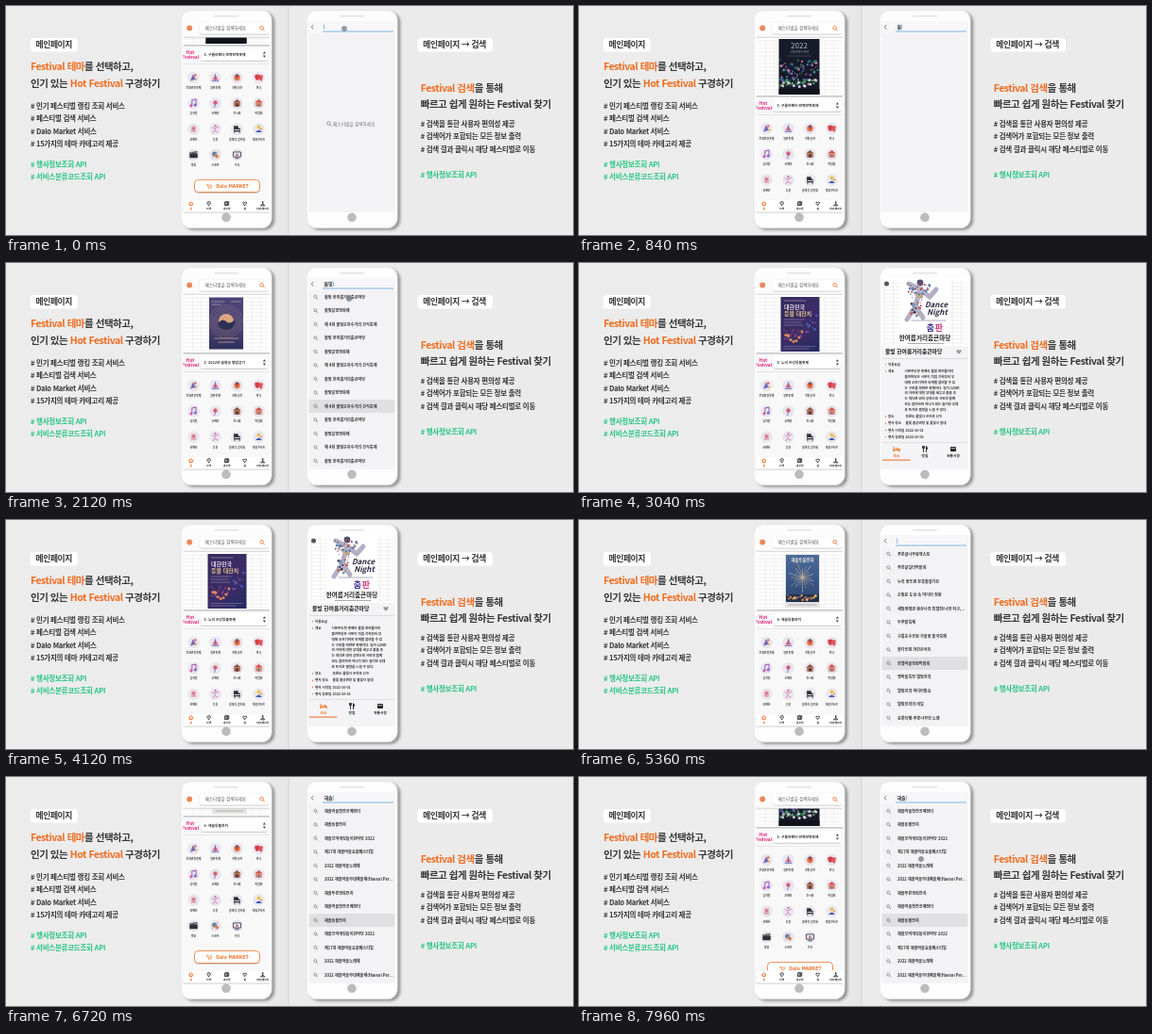
Recreate the animation shown at these times as an HTML page. Size 600 by 243 pixels, loop 8000 ms.

```html
<!DOCTYPE html>
<html lang="ko">
<head>
<meta charset="utf-8">
<title>Festival</title>
<style>
  html, body { margin: 0; width: 100%; height: 100%; overflow: hidden; background: #ebebeb; }
  svg { display: block; width: 100vw; height: 100vh; }
  text { font-family: "Noto Sans CJK KR", "Noto Sans CJK JP", "Noto Sans CJK", sans-serif; white-space: pre; }
</style>
</head>
<body>
<svg id="stage" viewBox="0 0 600 243" preserveAspectRatio="none">
  <defs>
    <linearGradient id="wall"><stop offset=".9" stop-color="#ececec"/><stop offset="1" stop-color="#e6e6e6"/></linearGradient>
    <linearGradient id="dusk" x2="0" y2="1"><stop stop-color="#4a4379"/><stop offset=".6" stop-color="#4b4271"/><stop offset="1" stop-color="#2d2f5c"/></linearGradient>
    <linearGradient id="navy" x2="1" y2="1"><stop stop-color="#352a5c"/><stop offset=".6" stop-color="#3b2c66"/><stop offset="1" stop-color="#232b62"/></linearGradient>
    <linearGradient id="sky" x2="0" y2="1"><stop stop-color="#4b6b9b"/><stop offset="1" stop-color="#2c4674"/></linearGradient>
    <pattern id="pages" width="9" height="4" patternUnits="userSpaceOnUse">
      <path d="M0 1H8" stroke="#e6e6e8" stroke-width=".7"/><path d="M8.6 0V4" stroke="#dcdcde" stroke-width=".5"/>
    </pattern>
    <filter id="shade" x="-20%" y="-10%" width="150%" height="125%"><feDropShadow dx="3" dy="2" stdDeviation="1.7" flood-opacity=".38"/></filter>
    <filter id="soft" x="-10%" y="-30%" width="120%" height="180%"><feDropShadow dx="0" dy=".6" stdDeviation=".6" flood-opacity=".35"/></filter>
    <clipPath id="homeClip"><rect x="187.5" y="33" width="91.5" height="172.5"/></clipPath>
    <clipPath id="searchClip"><rect x="320.5" y="16" width="91" height="202.5"/></clipPath>
  </defs>
  <rect width="600" height="243" fill="#ebebeb"/>
  <rect width="299" height="243" fill="url(#wall)"/>
  <path d="M299 0V243" stroke="#d5d5d5"/>
  <g id="copy"></g><g id="home"></g><g id="search"></g>
</svg>
<script>
const LOOP = 8000;
const ORANGE = '#ee6c1f', DARK = '#363638', GREEN = '#27c583';
const $ = id => document.getElementById(id);

// --- drawing helpers: each returns markup; text is centred vertically on y ---
const text = (x, y, size, str, fill = DARK, weight = 500, extra = '') =>
  `<text x="${x}" y="${y + size * .36}" font-size="${size}" fill="${fill}" font-weight="${weight}" ${extra}>${str}</text>`;
const mid = 'text-anchor="middle"';
const rect = (x, y, w, h, fill, r = 0, extra = '') =>
  `<rect x="${x}" y="${y}" width="${w}" height="${h}" rx="${r}" fill="${fill}" ${extra}/>`;
const dot = (x, y, r, fill, extra = '') => `<circle cx="${x}" cy="${y}" r="${r}" fill="${fill}" ${extra}/>`;
const line = (d, stroke, width = .6) =>
  `<path d="${d}" fill="none" stroke="${stroke}" stroke-width="${width}" stroke-linecap="round" stroke-linejoin="round"/>`;
const shape = (d, fill) => `<path d="${d}" fill="${fill}"/>`;
const at = (x, y, body, scale = 1) => `<g transform="translate(${x} ${y}) scale(${scale})">${body}</g>`;
const during = (spans, body) => `<g data-show="${spans}">${body}</g>`;
const times = (n, f) => Array.from({ length: n }, (_, i) => f(i)).join('');
const lens = (x, y, r, color, w) => dot(x, y, r, 'none', `stroke="${color}" stroke-width="${w}"`) +
  line(`M${x + r * .7} ${y + r * .7}l${r} ${r}`, color, w);
const orange = s => `<tspan fill="${ORANGE}" font-weight="700">${s}</tspan>`;

function phone(cx) {
  return rect(cx - 47.7, 4.8, 95.7, 230.6, '#fdfdfd', 10, 'filter="url(#shade)" stroke="#dcdcdf" stroke-width=".5"') +
    rect(cx - 13, 10, 26, 1.4, '#e2e2e5', .7) + dot(cx, 224.3, 4.8, '#bcbcbe') +
    rect(cx - 45.5, 16, 91, 202.5, '#f6f6f7');
}

// --- captions ---
const badge = (x, w, s) => rect(x, 34, w, 14.5, '#fff', 3.5) + text(x + 5.7, 41.3, 8.8, s, DARK, 600, 'letter-spacing="-.35"');
const heading = (x, y, s) => text(x, y, 10.5, s, DARK, 600, 'letter-spacing="-.47"');
const notes = (x, y, items, fill) => items.map((s, i) =>
  text(x, y + i * 13.1, 7.5, '# ' + s, fill, 700, 'letter-spacing="-.26"')).join('');
$('copy').innerHTML =
  badge(25.7, 50, '메인페이지') +
  heading(26, 64, orange('Festival 테마') + '를 선택하고,') +
  heading(26, 81.8, '인기 있는 ' + orange('Hot Festival') + ' 구경하기') +
  notes(26, 106.6, ['인기 페스티벌 랭킹 조회 서비스', '페스티벌 검색 서비스', 'Dalo Market 서비스', '15가지의 테마 카테고리 제공']) +
  notes(26, 168, ['행사정보조회 API', '서비스분류코드조회 API'], GREEN) +
  badge(435.5, 79.5, '메인페이지 → 검색') +
  heading(438.7, 87, orange('Festival 검색') + '을 통해') +
  heading(438.7, 104.5, '빠르고 쉽게 원하는 Festival 찾기') +
  notes(438.7, 125.6, ['검색을 통한 사용자 편의성 제공', '검색어가 포함되는 모든 정보 출력', '검색 결과 클릭시 해당 페스티벌로 이동']) +
  notes(438.7, 179.6, ['행사정보조회 API'], GREEN);

// --- posters ---
const sprinkle = (n, x, y, w, h, colors) => times(n, i =>
  dot((x + (i * .618 % 1) * w).toFixed(1), (y + (i * i * .377 % 1) * h).toFixed(1), .7 + i % 3 * .4, colors[i % colors.length]));

const gardenPoster = rect(211.5, 35, 43, 59, '#171a28') +
  text(233, 42.5, 8, '2022', '#b9bccb', 500, mid) + text(233, 49, 3, '구름라벤더 축제', '#9a9db0', 500, mid) +
  line('M221 53H245', '#5b6077') +
  sprinkle(70, 213, 57, 40, 26, ['#3b8f86', '#6f4f9c', '#2f5f95', '#c67bb0', '#3f7a48']) +
  sprinkle(40, 213, 78, 40, 8, ['#2f8a55', '#62a860', '#cfcbdc']) + rect(211.5, 88, 43, 6, '#11131c');

const palacePoster = rect(215, 36.5, 36, 55, 'url(#dusk)') +
  times(5, i => dot(233, 62, 8 + i * 2.3, 'none', 'stroke="#b59a82" stroke-width=".35"')) +
  dot(233, 62, 8, '#dca781') + shape('M224 64q5-6 9-2t9-2q2 9-9 11-8-1-9-7z', '#2d3155') +
  line('M218 41H231M218 44H227M238 41H248', '#d3b8a0') + line('M221 80H246M225 84H241', '#c5a592', .8);

const lanternPoster = rect(213.5, 36, 41, 58, 'url(#navy)') + line('M217 40H240', '#b9a6bd') +
  text(217, 47, 6, '대한민국', '#e6dcea', 700) + text(217, 54, 6, '등불 대잔치', '#e0c08a', 700) +
  line('M217 60H238M217 63H235M217 66H237', '#9d93b8') +
  sprinkle(24, 217, 71, 20, 13, ['#c2558e', '#8d3f86', '#d98a55']) + sprinkle(14, 240, 52, 12, 30, ['#5d5fb0', '#8c4c98', '#3c5aa8']) +
  line('M217 88.5H250M217 91H243', '#7d82b0');

const lightsPoster = rect(218, 36, 37, 57, '#e4e4e2') + rect(219, 37, 35, 50, 'url(#sky)') +
  text(236.5, 42, 4.4, '해솔등불잔치', '#f1ecd8', 600, mid) +
  times(20, i => {
    const a = i * Math.PI / 10, r = 9 + i % 3 * 3;
    return line(`M236.5 61l${(r * Math.cos(a)).toFixed(1)} ${(r * Math.sin(a)).toFixed(1)}`, i % 2 ? '#cfd0cb' : '#d0a468', .5);
  }) + rect(219, 79, 35, 8, '#22314c') + sprinkle(18, 221, 80, 31, 5, ['#e2b96c', '#c57351']) +
  line('M222 90H251', '#8c8b88');

const banners = [
  ['0-1500,7300-8000', gardenPoster, '5. 구름라벤더 반짝반짝축제'],
  ['1500-2800', palacePoster, '2. 2022년 솔향궁 별밤걷기'],
  ['2800-4700', lanternPoster, '5. 누리 은강등불축제'],
  ['4700-7300', lightsPoster, '6. 해솔등불잔치']
];

// --- category icons, drawn around 0,0 ---
const icons = [
  ['문화관광축제', shape('M-4 4L-1-4 3 2z', '#7668b4') + dot(2, -3, 1.5, '#e0605f') + dot(3, 2, 1.3, '#e5ad4c')],
  ['일반축제', shape('M-4 3L0-4 4 3z', '#e56d85') + line('M-4 4H4M0-4V3', '#5e77bd', 1)],
  ['전통공연', dot(0, 0, 4, '#e2895a') + shape('M-3-2H3L0 3z', '#d64739') + dot(0, -3, 1.5, '#45528d')],
  ['연극', shape('M-5-3Q0-5 1-3L0 3Q-5 4-5-3z', '#d53d48') + shape('M0-3Q5-4 5-2L4 4Q0 5 0-3z', '#e0525a')],
  ['뮤지컬', line('M-2 3V-4L3-5V2', '#9d56b4', 1.2) + dot(-3, 3, 1.8, '#db5fa0') + dot(2, 2, 1.8, '#7b6bc7')],
  ['오페라', dot(0, -1, 2.6, '#d65a78') + line('M0 1L-1 5', '#8f78b4', 1.2) + dot(2, -3, 1, '#efc5a2')],
  ['전시회', shape('M-5-1L0-5 5-1z', '#8a5040') + rect(-4, -1, 8, 5, '#bd6e4a') + rect(-1.5, 0, 3, 4, '#3f3a50')],
  ['박람회', shape('M-5-1L0-5 5-1z', '#d94b45') + rect(-4, -1, 8, 5, '#e08a6b') + rect(-1, 0, 2, 4, '#6674a8')],
  ['컨벤션', rect(-3, -4, 6, 8, '#eeb4ba', 1) + dot(0, -1, 1.6, '#ce6077') + line('M-2 2H2', '#8b76a0')],
  ['무용', dot(0, -4, 1.3, '#c2709a') + line('M-4-2L0-1 4-3M0-1L-1 2-3 5M-1 2L3 4', '#d79ac0', 1.2)],
  ['클래식 음악회', shape('M-4-4H1Q1-1 4 0V3H-4z', '#2e2d35') + line('M-3 1H3', '#fff', 1) + line('M-3 3V5M3 3V5', '#2e2d35', .8)],
  ['대중콘서트', dot(0, -2.5, 2.2, '#efc044') + shape('M-4 4Q0-2 4 4z', '#3f5db0') + dot(3, 0, 1.2, '#e0903f')],
  ['영화', rect(-5, -2, 10, 6, '#303037', 1) + shape('M-5-3L4-5 5-3-4-1z', '#45454d') + line('M-3-2l2-2M1-3l2-2', '#fff', .8)],
  ['스포츠', dot(-1, -1, 3, '#6f7d8d') + dot(2, 2, 2.2, '#dd824d') + line('M-4 4L3-4', '#a7adb6', 1)],
  ['기타', rect(-5, -4, 10, 7, '#34394b', 1) + rect(-4, -3, 8, 5, '#ececf1') + dot(0, 0, 1.6, '#c16c83') + line('M-2 4.5H2', '#34394b', 1)]
];
const category = ([name, art], i) => {
  const x = 198.5 + i % 4 * 23, y = 130 + Math.floor(i / 4) * 27.3;
  return dot(x, y, 6.3, '#e9e6ef') + at(x, y, art, .85) + text(x, y + 11, 2.9, name, '#444', 600, mid);
};

const cart = line('M-3-2H-2L-1 1.5H2.4L3-1H-1.6', ORANGE, .7) + dot(-.6, 3, .6, ORANGE) + dot(2, 3, .6, ORANGE);
const tabs = [
  ['홈', 'M-2.5 0L0-2.3 2.5 0M-1.8 0V2.3H1.8V0'],
  ['지역', 'M0 2.5C-4-1-1.5-2.6 0-2.6S4-1 0 2.5zM0-.6v.1'],
  ['내주변', 'M-2.5-2L-.8-2.5 .8-2 2.5-2.5V2L.8 2.5-.8 2-2.5 2.5zM-.8-2.5V2M.8-2V2.5'],
  ['찜', 'M0 2.3C-4-.5-2.2-3 0-1.2 2.2-3 4-.5 0 2.3z'],
  ['마이페이지', 'M-2.4 2.4Q0-1 2.4 2.4zM0-2.2Q1.3-1 0 .1-1.3-1 0-2.2z']
];

$('home').innerHTML = phone(233) +
  `<g clip-path="url(#homeClip)"><g id="scroller">` +
    rect(187.5, 33, 91.5, 62, '#fff') + rect(189, 36, 89, 57, 'url(#pages)') +
    banners.map(([spans, poster]) => during(spans, poster)).join('') +
    rect(187.5, 96.5, 91.5, 170, '#f8f8f9') + rect(187.5, 95.3, 91.5, 1.1, '#b4b4b8') +
    text(195, 103.2, 4.7, 'Hot', '#e21b78', 800, mid) + text(195.2, 108.3, 4.7, 'Festival', '#e21b78', 800, mid) +
    rect(205.5, 99, 71.5, 12.8, '#fff', 2.5, 'filter="url(#soft)"') +
    banners.map(([spans, , label]) => during(spans, text(209.5, 105.4, 3.8, label, '#333', 700))).join('') +
    shape('M271.8 104.5l1.6-2.2 1.6 2.2zM271.8 106.5l1.6 2.2 1.6-2.2z', '#444') +
    rect(187.5, 115, 91.5, .7, '#dededf') + icons.map(category).join('') +
    rect(199.5, 238.5, 69, 13, '#fff', 4, `stroke="${ORANGE}" stroke-width=".7" filter="url(#soft)"`) +
    at(215, 245, cart, .9) + text(239.5, 245, 5.2, 'Dalo MARKET', ORANGE, 700, mid) +
  `</g></g>` +
  rect(187.5, 16, 91.5, 17, '#fbfbfb') + rect(187.5, 32.8, 91.5, .8, '#c9c9cc') + dot(194.2, 23.5, 3, '#e98a5a') +
  rect(204.5, 17.6, 73.5, 12, '#fff', 2.5, 'filter="url(#soft)"') +
  text(210.5, 23.8, 4.6, '페스티벌을 검색하세요', '#555') + lens(270.6, 23.2, 1.8, ORANGE, .8) +
  rect(187.5, 205.5, 91.5, 13, '#fff', 0, 'filter="url(#soft)"') +
  tabs.map(([name, d], i) => {
    const x = 195.7 + i * 19, color = i ? '#333' : ORANGE;
    return at(x, 209.6, line(d, color, 1.2), .8) + text(x, 214.6, 2.8, name, color, 700, mid);
  }).join('');

// --- search results and detail page ---
const lanes = ['물빛 한여름거리춤큰마당', '물빛달밤영화제', '제 4회 물빛은하수거리 간식축제'];
const shore = ['해솔마을찻잔공예장터', '해솔등불잔치', '해솔꼬마게임놀이한마당 2022', '제17회 해솔마을요술페스티벌',
  '2022 해솔마을노래제', '2022 해솔마을무대예술제(Haesol Per...', '해솔푸른영화잔치'];
const everything = ['푸른골나무숲엑스포', '푸른골일터박람회', '누리 꽃농원 분홍물결가든', '은빛문 도심 속 미디어 정원',
  '새빛생태관 환상나라 특별전(나와 지구,...', '두루탈축제', '구름호수공원 가을꽃 들국축제', '솔다공원 야간콘서트',
  '한별마을정원박람회', '옛마을축전 별빛성곽', '별빛성곽 미디어빛쇼', '별빛성곽의 비밀', '초록티켓-푸른나무의 노래'];
const results = names => rect(320.5, 145, 91, 14, '#e0e0e3') + times(13, i => {
  const y = 36.1 + i * 14.5;
  return lens(327.3, y - .4, 1.5, '#66666b', .6) + text(337, y, 4.15, names[i % names.length], '#2c2c2e', 700);
});

const story = ['시민주도형 축제인 물빛 한여름거리', '춤큰마당은 시민이 직접 기획부터 무', '대에 오르기까지 단계별 참여할 수 있',
  '는 구조를 마련한 축제이다. 길이 120m', '의 거리에 대형 무대를 세우고 춤을 추', '는 색다른 야외 공연으로 시민과 함께',
  '모두 참여하여 하나가 되는 즐거운 무대', '로 뜨거운 열정을 느낄 수 있다.'];
const facts = [[107.6, '이용요금', ''], [115, '개요', ''], [163, '장소', '푸른도 물빛시 은하로 170'],
  [170.2, '행사 장소', '물빛 춤공연장 및 물빛시 일대'], [177.4, '행사 시작일', '2022-10-01'], [184.6, '행사 종료일', '2022-10-03']];
const small = (x, y, s) => text(x, y, 3.6, s, '#333', 600, 'letter-spacing="-.05"');
const dancer = dot(361, 21, 3.4, '#55536f') +
  line('M361 28L349 22M361 28L371 36 378 28M361 28L356 46 347 60M356 46L364 58', '#b4afc4', 5) +
  sprinkle(24, 348, 22, 24, 12, ['#4c4a66', '#b5525f', '#5d7fae']) +
  sprinkle(30, 351, 33, 12, 24, ['#3b3950', '#c25d6d', '#6d9ccc', '#8a87a0', '#d3a860']);
const detail = rect(320.5, 16, 91, 203, '#f4f3f5') + rect(320.5, 16, 91, 72, '#fff') + rect(322, 18, 88, 69, 'url(#pages)') +
  rect(340, 16, 52, 71.5, '#fff') + dancer +
  text(378, 44, 8, 'Dance', '#2b2940', 700, 'text-anchor="middle" font-style="italic"') +
  text(379, 52, 8, 'Night', '#2b2940', 700, 'text-anchor="middle" font-style="italic"') +
  line('M352 61H388', '#8d88a4', .7) + text(372, 69, 9, '춤', '#3d3190', 900, mid) + text(381, 69, 9, '판', '#d03a85', 900, mid) +
  text(366, 80, 6.6, '한여름거리춤큰마당', '#222', 900, mid) + line('M348 85.5H386', '#8a8796', .7) +
  dot(325.5, 22, 2.5, '#55555c') +
  text(324, 93.5, 5.8, '물빛 한여름거리춤큰마당', '#1d1d1f', 800) + at(402, 94, shape(tabs[3][1], '#9a9aa0'), 1.1) +
  rect(320.5, 101, 91, 1, '#dcdcdf') +
  facts.map(([y, key, value]) => dot(324.5, y, .7, ORANGE) + small(327, y, key) + small(345.5, y, value)).join('') +
  story.map((s, i) => small(344.5, 115 + i * 5.75, s)).join('') +
  rect(320.5, 190, 91, .7, '#d8d8db') + rect(320.5, 208.6, 30, 1, ORANGE) +
  at(336, 197.5, line('M-3-2V2.5M-3 1H3V2.5M3 1V-.5H-1', ORANGE, 1)) +
  at(366, 197.5, line('M-1.5-3V3M-2.5-3V-1H-.5V-3M1.5 3V-3Q3-2 2.5 0H1.5', '#222', .9)) +
  at(396, 197.5, rect(-3, -2.5, 6, 5, '#222', .8) + line('M-2-.8H2', '#fff', .7)) +
  ['숙소', '맛집', '전통시장'].map((s, i) => text(336 + i * 30, 204.6, 3.7, s, i ? '#222' : ORANGE, 700, mid)).join('');

const pointer = (spans, x, y) => during(spans, dot(x, y, 2.6, '#737c8c', 'opacity=".75" stroke="#4c5464" stroke-width=".5"'));
$('search').innerHTML = phone(366) + `<g clip-path="url(#searchClip)">` +
  rect(320, 16, 92, 203, '#f3f2f4') +
  during('0-450', lens(341.5, 124.4, 1.8, '#707076', .7) + text(346, 125, 4.7, '페스티벌을 검색하세요', '#707076')) +
  during('1500-2400,4350-4650', results(lanes)) +
  during('4650-6150', results(everything)) +
  during('6150-8000', results(shore)) +
  rect(320.5, 16, 91, 13.5, '#f7f6f8') + line('M325 20.3l-1.8 1.9 1.8 1.9', '#444', .7) +
  rect(335, 26.3, 75, 1.5, '#a5cbea') +
  `<text id="query" x="336.5" y="24.2" font-size="5" fill="#333" font-weight="600"></text>` +
  rect(0, 19.5, .6, 5.5, '#3d8bd4', 0, 'id="caret"') +
  during('2400-4350', detail) +
  pointer('0-300', 358, 24) + pointer('1900-2400', 363, 38) + pointer('7650-8000', 362, 87) + `</g>`;

// --- timeline ---
const typing = [[0, ''], [450, 'ㅁ'], [600, '무'], [750, '물'], [1130, '물ㅂ'], [1270, '물비'], [1400, '물빛'], [4500, '물'], [4620, ''],
  [5600, 'ㅎ'], [5720, '하'], [5840, '해'], [5980, '해ㅅ'], [6080, '해소'], [6200, '해솔']];
const scrollKeys = [[0, 54], [200, 54], [650, 0], [5750, 0], [6250, 54], [7850, 54], [7960, 42], [8000, 36]];
const timed = [...document.querySelectorAll('[data-show]')].map(el =>
  ({ el, spans: el.dataset.show.split(',').map(s => s.split('-').map(Number)) }));

function scrollAt(t) {
  const i = Math.max(1, scrollKeys.findIndex(([time]) => time > t));
  const [[t0, a], [t1, b]] = [scrollKeys[i - 1], scrollKeys[i]];
  const p = (t - t0) / (t1 - t0);
  return a + (b - a) * p * p * (3 - 2 * p);
}

function render(t) {
  for (const { el, spans } of timed)
    el.style.display = spans.some(([from, to]) => t >= from && t < to) ? '' : 'none';
  $('scroller').setAttribute('transform', `translate(0 ${-scrollAt(t)})`);
  const word = typing.filter(([time]) => time <= t).pop()[1];
  if ($('query').textContent !== word) $('query').textContent = word;
  $('caret').setAttribute('x', 336.5 + word.length * 4.7);
}

let start;
function tick(now) {
  start ??= now;
  render((now - start) % LOOP);
  requestAnimationFrame(tick);
}
render(0);
requestAnimationFrame(tick);
</script>
</body>
</html>
```
